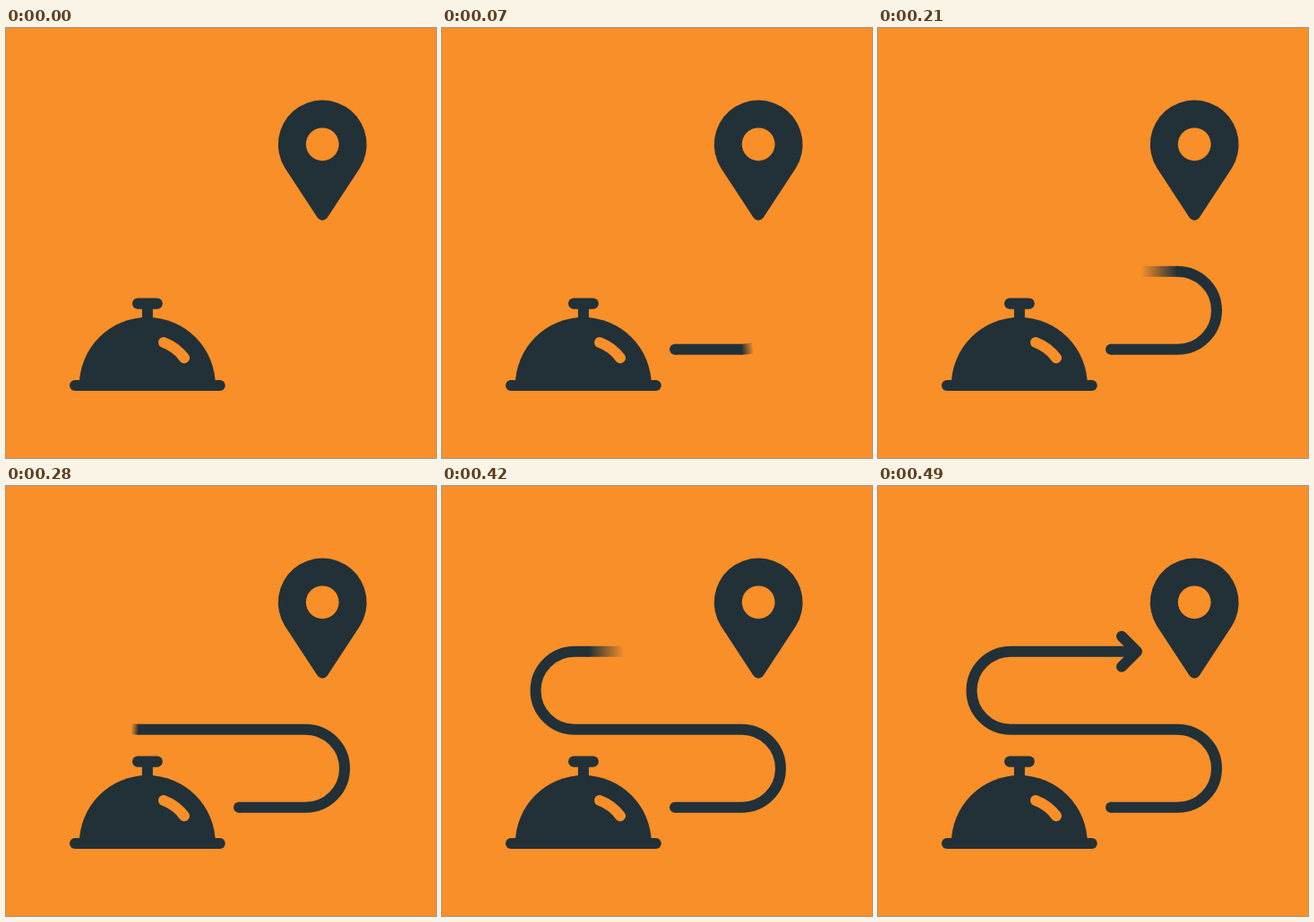
Write an HTML page that moves like this. It is 480x480 px and loops after 3100 ms.

```html
<!DOCTYPE html>
<html lang="en">
<head>
<meta charset="utf-8">
<title>Delivery route</title>
<style>
  html, body { margin: 0; height: 100%; overflow: hidden; background: #f98f28; }
  svg { display: block; width: 100vw; height: 100vh; }
</style>
</head>
<body>
<svg viewBox="0 0 480 480" fill="#223138">
  <defs>
    <path id="route" d="M260 358.8H334.5A43.5 43.5 0 0 0 334.5 271.8H148A43.5 43.5 0 0 1 148 184.8H288"/>
    <linearGradient id="fade" gradientUnits="userSpaceOnUse">
      <stop offset="0" stop-color="#223138"/>
      <stop offset="1" stop-color="#223138" stop-opacity="0"/>
    </linearGradient>
  </defs>

  <!-- map pin -->
  <path d="M311.5 156.5A49.4 49.4 0 1 1 394.9 156.5L358.5 212Q353.2 217.5 347.9 212Z"/>
  <circle cx="353.2" cy="129.8" r="18.4" fill="#f98f28"/>

  <!-- serving dome -->
  <rect x="141" y="301.5" width="33.8" height="12.3" rx="6.1"/>
  <rect x="151.9" y="312" width="12" height="14"/>
  <path d="M81.8 399A76 76 0 0 1 233.8 399Z"/>
  <rect x="71" y="393" width="173.7" height="12" rx="5.8"/>
  <path d="M176 351A51.2 51.2 0 0 1 199 368.3" fill="none" stroke="#f98f28" stroke-width="12" stroke-linecap="round"/>

  <!-- route with a soft leading edge -->
  <g id="trail" fill="none" stroke="#223138" stroke-width="12">
    <path d="M260 358.8h.01" stroke-linecap="round"/>
    <use id="solid" href="#route"/>
    <use id="head" href="#route" stroke="url(#fade)"/>
    <path id="arrow" d="M272 167.8L289 184.8L272 201.8" stroke-linecap="round" stroke-linejoin="round"/>
  </g>
</svg>
<script>
const $ = id => document.getElementById(id);
const LOOP = 3100, STEP = 70, STEPS = 7, SOFT = 40;
const route = $("route"), total = route.getTotalLength();

// lengths at which the route changes between line and arc
const turn = Math.PI * 43.5, line = 74.5, middle = 186.5;
const bends = [0, line, line + turn, line + turn + middle, line + 2 * turn + middle];

// even steps along the first bend, then a longer and slightly faster stretch
const reach = i => i <= 3 ? 6 + 82 * i : 406 + 92 * (i - 4);

const visible = (id, yes) => $(id).setAttribute("visibility", yes ? "visible" : "hidden");
const dash = (id, ...lengths) => $(id).setAttribute("stroke-dasharray", lengths.join(" "));

function show(i) {
  const done = i === STEPS;
  const tip = done ? total : reach(i);
  // the soft edge never reaches back around a bend
  const bend = Math.max(...bends.filter(b => b < tip));
  const from = done ? total : Math.max(tip - SOFT, bend);
  visible("trail", i > 0);
  visible("arrow", done);
  visible("head", i > 0 && !done);
  if (!i) return;
  dash("solid", from, total + 9);
  dash("head", 0, from - 1, tip - from + 1, total);
  const a = route.getPointAtLength(from), b = route.getPointAtLength(tip);
  const ends = { x1: a.x, y1: a.y, x2: b.x, y2: b.y };
  for (const k in ends) $("fade").setAttribute(k, ends[k]);
}

const start = performance.now();
function tick() {
  const t = (performance.now() - start) % LOOP;
  show(Math.min(Math.floor(t / STEP), STEPS));
  requestAnimationFrame(tick);
}
tick();
</script>
</body>
</html>
```
